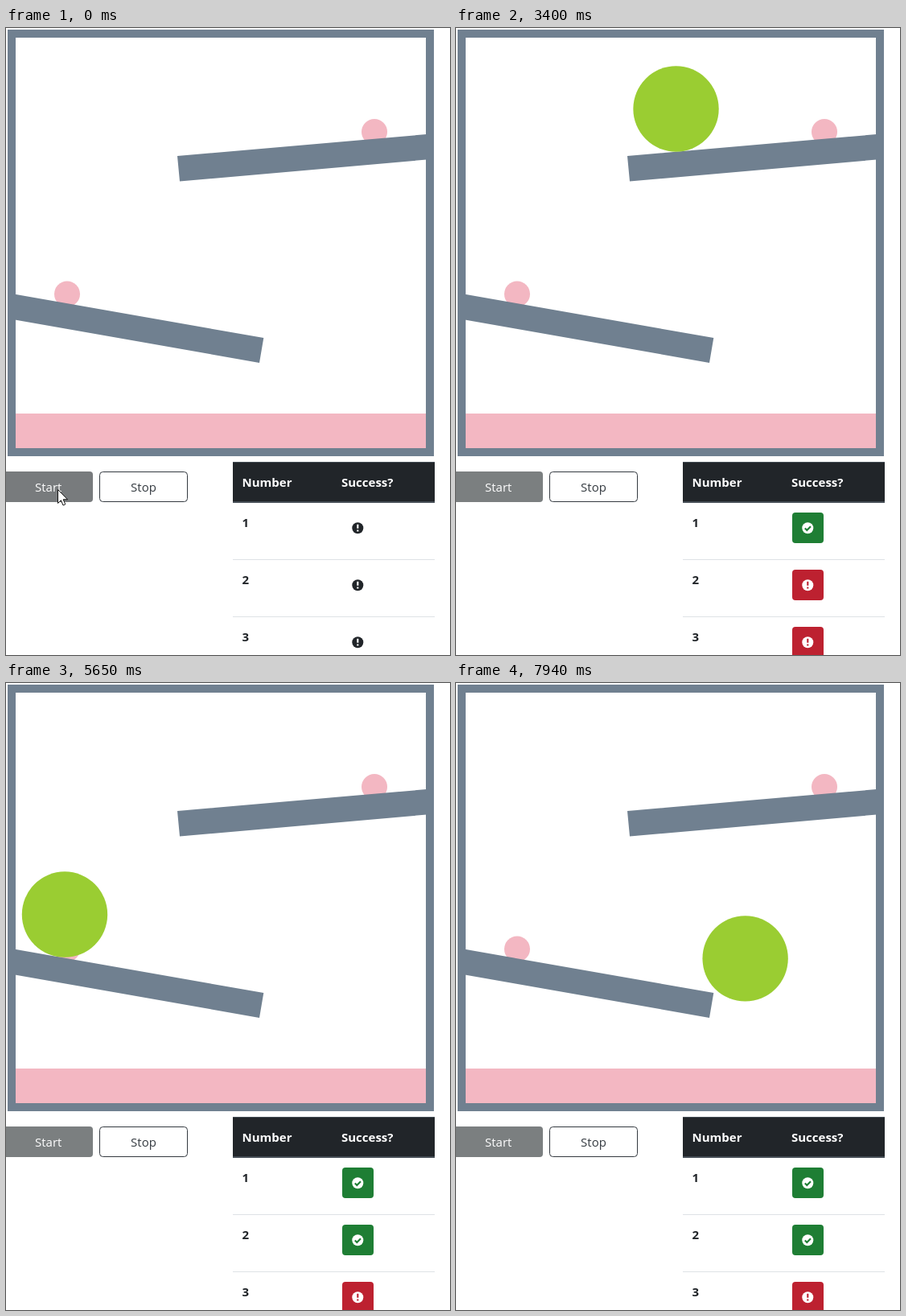
These frames come from a looping animation (552x779 px, 7990 ms). An HTML page:

```html
<!DOCTYPE html>
<html lang="en">
<head>
<meta charset="utf-8">
<title>Rolling ball</title>
<style>
  html, body { margin: 0; width: 100%; height: 100%; overflow: hidden; background: #fff; }
  svg { display: block; width: 552px; height: 779px; }
  text { font: 15px "Open Sans", "Noto Sans", sans-serif; fill: #212529; }
  .bold { font-weight: 700; }
  .mid { text-anchor: middle; }
  .light { fill: #fff; }
  .steel { fill: #708090; }
  .pink { fill: #f3b7c2; }
</style>
</head>
<body>
<svg viewBox="0 0 552 779">
  <rect class="pink" x="11" y="479" width="512" height="44"/>
  <circle class="pink" cx="458" cy="129" r="16"/>
  <circle class="pink" cx="76" cy="330.5" r="16"/>
  <path class="steel" fill-rule="evenodd" d="M2 2H532V532H2ZM12 12V522H522V12Z"/>
  <path class="steel" d="M213 159L523 132V163.5L216 190.5ZM11 330.8L320.3 385L315 416L11 362.5Z"/>
  <circle id="ball" r="53.2" fill="#9acd32"/>

  <rect id="start" x="-4" y="551" width="112" height="38" rx="4"/>
  <text class="mid light" x="52.7" y="576">Start</text>
  <rect x="116.5" y="551.5" width="109" height="37" rx="4" fill="#fff" stroke="#343a40"/>
  <text class="mid" x="171" y="576" style="fill:#343a40">Stop</text>

  <rect x="282" y="539" width="251" height="51" fill="#454d55"/>
  <rect x="282" y="540" width="251" height="48" fill="#212529"/>
  <text class="bold light" x="293.5" y="570">Number</text>
  <text class="bold light" x="417" y="570">Success?</text>
  <path d="M282 660.5H533M282 731.5H533" stroke="#dee2e6"/>
  <g id="rows"></g>

  <path id="cursor" d="M64.5 573.5V590.5L68.4 586.8L71 593L73.8 591.8L71.2 585.8H76.5Z" fill="#fff" stroke="#111"/>
</svg>
<script>
const LOOP = 7990;
const ARMED = 60;
const PASSED = [130, 4620, Infinity];
const GRAVITY = 8.6e-4;

const $ = id => document.getElementById(id);
const set = (el, attrs) => {
  for (const k in attrs) el.setAttribute(k, attrs[k]);
};
const show = (el, on) => set(el, { visibility: on ? "visible" : "hidden" });

$("rows").innerHTML = PASSED.map((_, i) => `
  <g transform="translate(0 ${71 * i})">
    <text class="bold" x="293.5" y="620">${i + 1}</text>
    <rect x="418" y="602" width="39" height="38" rx="4"/>
    <circle cx="437.3" cy="621.3" r="7"/>
    <path fill="none" stroke-width="2.1"/>
  </g>`).join("");
const rows = [...$("rows").children].map(g => g.children);

const BANG = "M437.3 616.8V621.8M437.3 623.4V625.6";
const CHECK = "M433.8 621.6L436.3 624L441 619.3";

function drawRow([, box, disc, mark], t, passed) {
  const armed = t >= ARMED, ok = t >= passed;
  const color = ok ? "#1e7e34" : "#bd2130";
  set(box, { fill: armed ? color : "#fff" });
  set(disc, { fill: armed ? "#fff" : "#212529" });
  set(mark, { d: ok ? CHECK : BANG, stroke: armed ? color : "#fff" });
}

// Height of the ball's centre while it rests on each ramp.
const onUpper = x => 124.4 - 0.0874 * x;
const onLower = x => 274.8 + 0.175 * x;

// Distance rolled after a time on each ramp.
const rollUpper = t => t * (0.0125 + 1.25e-5 * t + 1.25e-9 * t * t);
const rollLower = t => 4.2e-5 * t * t;

const point = (t, x, y) => ({ t, x, y });
const drop = point(100, 469, 66);
const land = point(330, 466, onUpper(466));
const edge = point(3920, 202, onUpper(202));
const clear = point(4160, 170, 126);
const bounce = point(4650, 97, onLower(97));
const settle = point(5215, 65, onLower(65));
const tip = point(7722, 329, onLower(329));
const leave = point(7940, 359.5, 342.2);

// Free flight through two points under gravity.
function fly(a, b, t) {
  const s = (t - a.t) / (b.t - a.t);
  const lift = GRAVITY / 2 * (t - a.t) * (b.t - t);
  return [a.x + (b.x - a.x) * s, a.y + (b.y - a.y) * s - lift];
}

function ballAt(t) {
  if (t < land.t) return fly(drop, land, t);
  if (t < edge.t) {
    const x = land.x - rollUpper(t - land.t);
    return [x, onUpper(x)];
  }
  if (t < clear.t) return fly(edge, clear, t);
  if (t < bounce.t) return fly(clear, bounce, t);
  if (t < settle.t) return fly(bounce, settle, t);
  if (t < tip.t) {
    const x = settle.x + rollLower(t - settle.t);
    return [x, onLower(x)];
  }
  return fly(tip, leave, t);
}

function draw(t) {
  const [cx, cy] = ballAt(t);
  set($("ball"), { cx, cy });
  show($("ball"), t >= drop.t);
  show($("cursor"), t < 130);
  set($("start"), { fill: t < ARMED ? "#787b7d" : "#7b7f80" });
  rows.forEach((row, i) => drawRow(row, t, PASSED[i]));
}

const began = performance.now();
function tick() {
  draw((performance.now() - began) % LOOP);
  requestAnimationFrame(tick);
}
tick();
</script>
</body>
</html>
```
